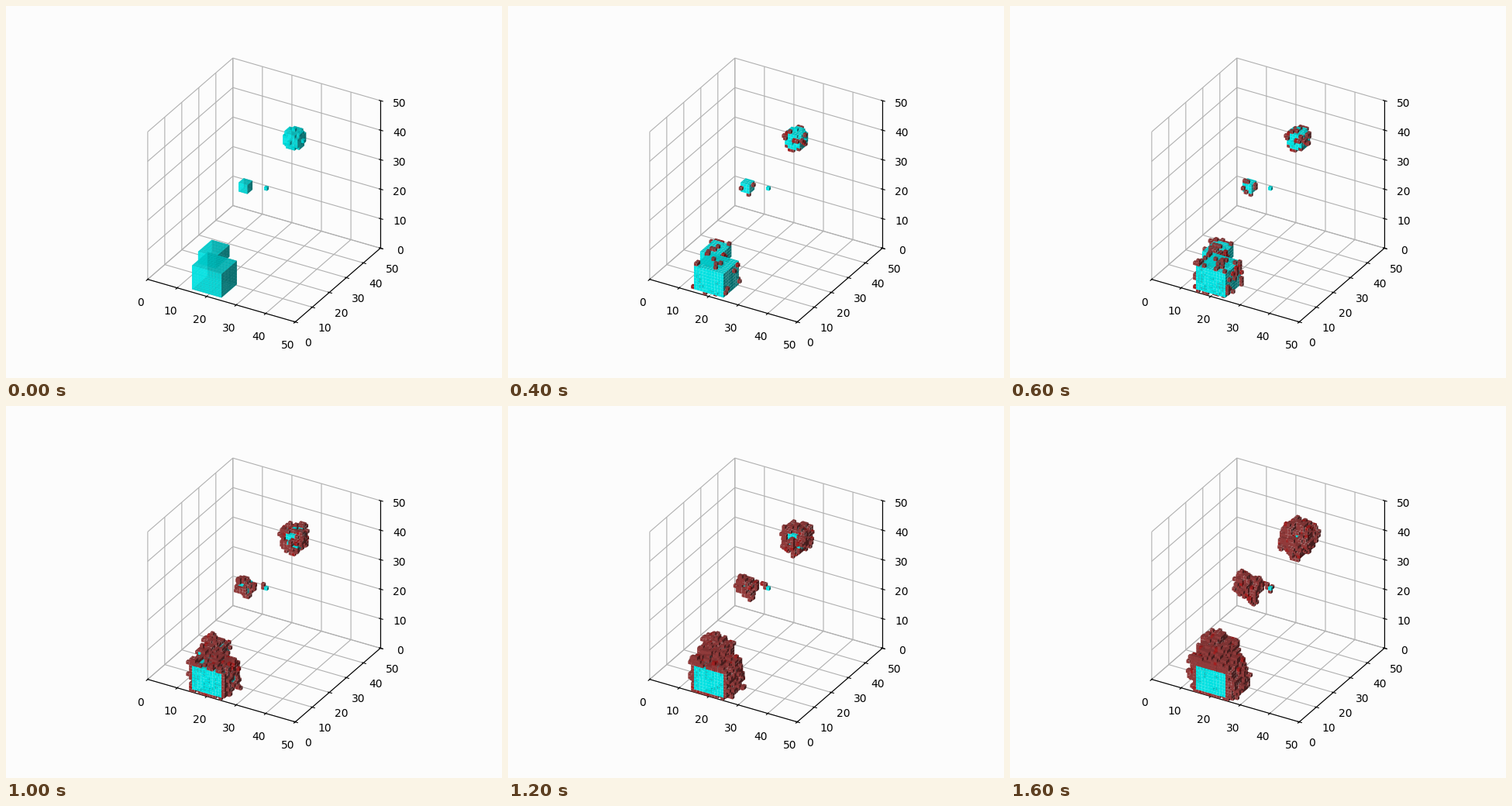
These frames come from a looping animation (640 px wide and 480 px high, 1800 ms). A matplotlib script:

```python
import numpy as np
import matplotlib.pyplot as plt
from matplotlib.animation import ArtistAnimation
from mpl_toolkits.mplot3d.art3d import Poly3DCollection

SIZE = 50
CYAN = np.array([0.0, 1.0, 1.0])
BROWN = np.array([0.64, 0.26, 0.26])
RED = np.array([0.72, 0.14, 0.14])
LIGHT = np.array([-2, -2, 1]) / 3
# Chance that a filled neighbour spreads into an empty cell, per step.
SPREAD = [0.03, 0.05, 0.13, 0.19, 0.23, 0.25, 0.26, 0.26]
# The lone voxel grows only a short tail: step -> new cells.
LONE = (25, 25, 25)
TAIL = {4: [(24, 25, 25)],
        5: [(24, 25, 26)],
        6: [(23, 25, 26)],
        7: [(25, 25, 24)],
        8: [(25, 26, 25)]}


def block(x, y, z):
    cells = np.zeros((SIZE,) * 3, bool)
    cells[slice(*x), slice(*y), slice(*z)] = True
    return cells


def ball(center, radius):
    grid = np.indices((SIZE,) * 3)
    offset = grid - np.reshape(center, (3, 1, 1, 1))
    return (offset ** 2).sum(axis=0) <= radius ** 2


def neighbour(cells, axis, step):
    """Value of the cell one step along the axis; False outside the box."""
    padded = np.pad(cells, 1)
    return np.roll(padded, -step, axis)[1:-1, 1:-1, 1:-1]


def grow(cells, chance, rng):
    count = sum(neighbour(cells, a, s).astype(int)
                for a in range(3) for s in (-1, 1))
    hit = rng.random(cells.shape) < 1 - (1 - chance) ** count
    return cells | hit


def faces(cells, axis, step):
    """Cells with an open side in this direction, and the side's corners."""
    found = np.argwhere(cells & ~neighbour(cells, axis, step))
    square = np.zeros((4, 3))
    square[:, axis] = step > 0
    square[:, (axis + 1) % 3] = [0, 1, 1, 0]
    square[:, (axis + 2) % 3] = [0, 0, 1, 1]
    return found, found[:, None, :] + square


def voxels(cells, base, alpha):
    verts, colors = [], []
    # Only the sides turned to the viewer matter once opaque.
    sides = [(0, 1), (1, -1), (2, 1)]
    if alpha < 1:
        sides += [(0, -1), (1, 1), (2, -1)]
    for axis, step in sides:
        found, quads = faces(cells, axis, step)
        shade = 0.3 + 0.35 * (1 + step * LIGHT[axis])
        rgb = base[tuple(found.T)] * shade
        verts.append(quads)
        colors.append(np.column_stack([rgb, np.full(len(rgb), alpha)]))
    return Poly3DCollection(np.concatenate(verts),
                            facecolors=np.concatenate(colors))


fig = plt.figure(figsize=(6.4, 4.8), dpi=100, facecolor="#fcfcfc")
ax = fig.add_subplot(projection="3d", proj_type="ortho", facecolor="none")
ax.set(xlim=(0, SIZE), ylim=(0, SIZE), zlim=(0, SIZE))
ax.set_box_aspect((1, 1, 1))
for axis in (ax.xaxis, ax.yaxis, ax.zaxis):
    axis.set_pane_color((1, 1, 1, 0))

rng = np.random.default_rng(7)
body = (block((15, 25), (0, 9), (1, 9)) | block((9, 15), (14, 22), (1, 5))
        | block((25, 28), (10, 13), (32, 35)) | ball((27, 38, 36), 3))
lone = np.zeros_like(body)
lone[LONE] = True

base = np.where(rng.random(body.shape)[..., None] < 0.1, RED, BROWN)
base[body | lone] = CYAN

scenes = []
for step in range(len(SPREAD) + 1):
    if step:
        body = grow(body, SPREAD[step - 1], rng)
    for cell in TAIL.get(step, []):
        lone[cell] = True
    scene = voxels(body | lone, base, 1 if step else 0.8)
    ax.add_collection3d(scene)
    scenes.append([scene])

anim = ArtistAnimation(fig, scenes, interval=200, repeat=True, repeat_delay=0)
plt.show()
```
